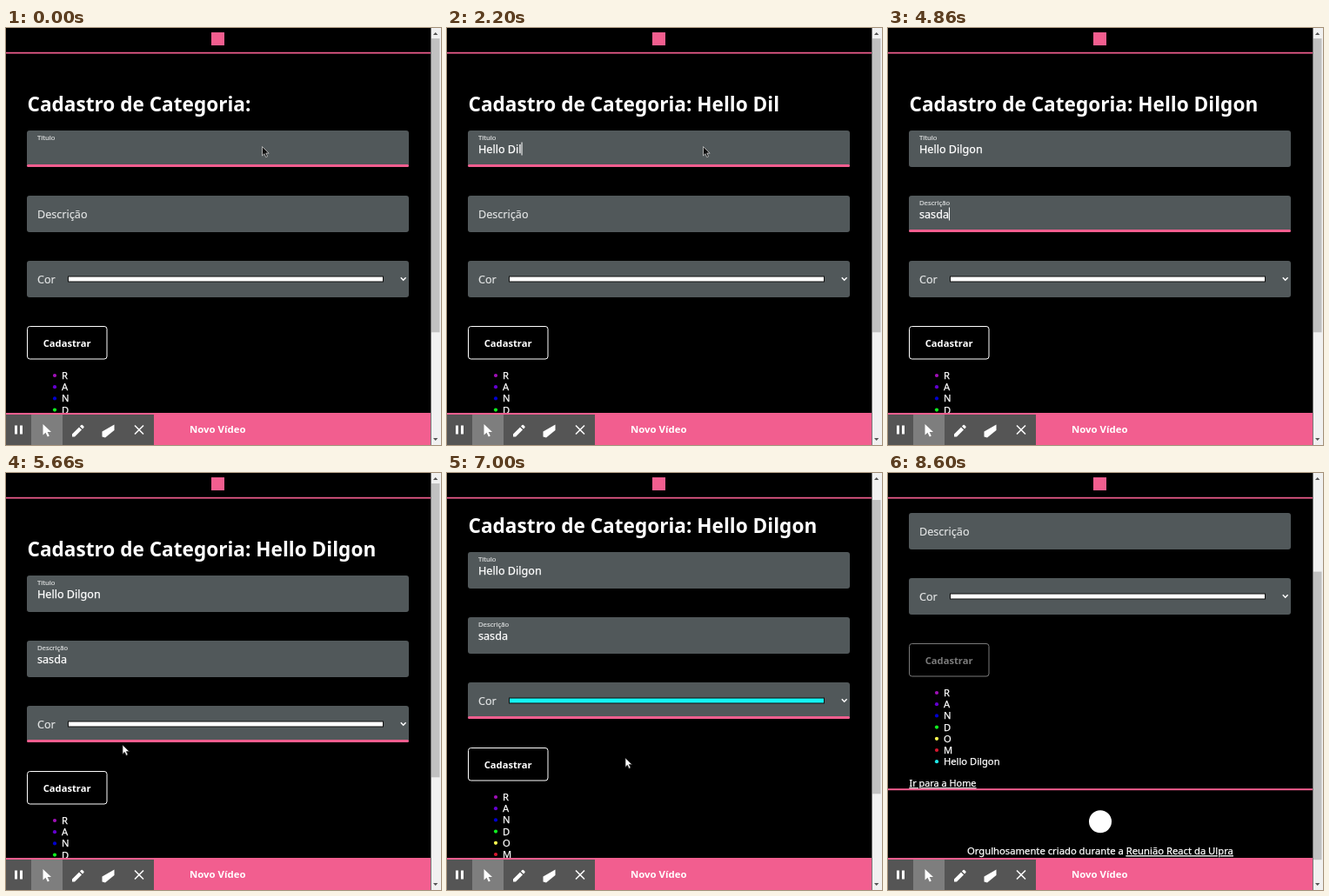
An HTML page for the animation above (8860 ms loop, 500 by 480 pixels).

```html
<!DOCTYPE html>
<html lang="pt">
<head>
<meta charset="utf-8">
<style>
html, body { margin: 0; width: 100%; height: 100%; overflow: hidden; background: #000; }
svg { display: block; font-family: "Noto Sans", "Open Sans", sans-serif; }
text { fill: #fff; stroke: #fff; stroke-width: .25; white-space: pre; }
.label { fill: #e2e4e4; stroke: #e2e4e4; stroke-width: .15; }
.bold { font-weight: 700; stroke: none; }
.pink { fill: #f25e8f; }
.link { text-decoration: underline; }
</style>
</head>
<body>
<svg id="stage" width="500" height="480" viewBox="0 0 500 480">
  <rect width="500" height="480"/>
  <g id="page">
    <text id="title" class="bold" x="24.5" y="96" font-size="22.6"></text>
    <g id="fields"></g>
    <rect id="swatch" x="71.5" y="286" width="362" height="6" stroke="#111"/>
    <path d="M453.8 287.3l2.9 2.9l2.9-2.9" fill="none" stroke="#fff" stroke-width="1.5"/>
    <g id="button">
      <rect x="24.5" y="343.5" width="91.5" height="37.5" rx="3" fill="none" stroke="#fff"/>
      <text class="bold" x="42.7" y="366.7" font-size="11.2">Cadastrar</text>
    </g>
    <g id="list" font-size="11.2"></g>
    <g id="foot">
      <text class="link" x="24.5" y="495" font-size="10.9">Ir para a Home</text>
      <rect class="pink" y="497" width="488" height="2"/>
      <circle cx="244" cy="535" r="13" fill="#fff"/>
      <text x="91" y="573" font-size="11.25">Orgulhosamente criado durante a <tspan class="link">Reunião React da Ulpra</tspan></text>
    </g>
  </g>
  <rect width="488" height="29"/>
  <rect class="pink" x="236" y="5" width="15" height="15"/>
  <rect class="pink" y="27.8" width="488" height="1.7"/>
  <rect class="pink" y="443" width="488" height="37"/>
  <text class="bold" x="211" y="466" font-size="11.4">Novo Vídeo</text>
  <rect y="445" width="170" height="35" fill="#555"/>
  <rect x="29" y="445" width="36" height="35" fill="#7e7e7e"/>
  <g fill="#fff">
    <path d="M10 457.500h3v10h-3zM16 457.500h3v10h-3z"/>
    <path d="M42.500 456v12.500l3-2.700l2.300 4.700l2-1l-2.200-4.600h4.400z"/>
    <path d="M76 470.500v-3l8-8l3 3l-8 8zM85 458.500l1.400-1.400q.8-.6 1.500 0l1.500 1.500q.6.800 0 1.500l-1.400 1.400z"/>
    <path d="M110.500 464.500l14-8v6.500l-10.500 8.500l-3.500-1z"/>
    <path d="M148 457.500l10 10m0-10l-10 10" stroke="#fff" stroke-width="1.600"/>
  </g>
  <rect x="488.5" width="11.5" height="480" fill="#f1f1f1"/>
  <rect id="thumb" x="489" width="9.500" fill="#c1c1c1"/>
  <path d="M491 8l2.700-3l2.700 3zM491 472l2.700 3l2.700-3z" fill="#555"/>
  <circle id="ring" fill="none" stroke="#a01028" stroke-width="1.200"/>
  <path id="arrow" d="M0 0v10.500l2.400-2.200l1.800 3.900l1.900-.9l-1.800-3.700h3.400z" stroke-width=".8"/>
  <path id="hand" d="M3 0q1.400 0 1.400 1.400v4q1-.6 2 .2q1.200-.4 2 .5q1.900-.2 1.900 1.700v3.200q0 2-1.200 3.200v1.600h-5.600v-1.400q-2.200-2.200-3.400-4.900q.5-1.700 1.700-.3v-7.800q0-1.400 1.200-1.400z" fill="#fff" stroke="#333" stroke-width=".7"/>
</svg>
<script>
const LOOP = 8860, PINK = '#f25e8f', WORD = 'Hello Dilgon';
const TITLE_KEYS = [200, 330, 660, 800, 1000, 1260, 1730, 1800, 2200, 2260, 2330, 2400];
const TEXT_KEYS = [4400, 4460, 4530, 4600, 4860];
const FOCUS = [-1000, 3400, 5330], PRESS = 7600, SUBMIT = 7730;
const PITCH = 13.2;

const $ = id => document.getElementById(id);
const set = (el, attrs) => { for (const k in attrs) el.setAttribute(k, attrs[k]); };
const add = (parent, tag, attrs, text = '') => {
  const el = document.createElementNS('http://www.w3.org/2000/svg', tag);
  set(el, attrs);
  el.textContent = text;
  return parent.appendChild(el);
};
const span = (t, a, b) => Math.min(1, Math.max(0, (t - a) / (b - a)));
const smooth = k => k * k * (3 - 2 * k);
const easeOut = k => 1 - (1 - k) ** 2;
const mix = (a, b, k) => a + (b - a) * k;
const show = (el, on) => set(el, { visibility: on ? 'visible' : 'hidden' });

const fields = ['Título', 'Descrição', 'Cor'].map((name, i) => {
  const g = add($('fields'), 'g', { transform: `translate(24 ${118 + 75 * i})` });
  add(g, 'rect', { width: 439, height: 42, rx: 3, fill: '#51585a' });
  return {
    line: add(g, 'rect', { y: 39, width: 439, height: 3, rx: 1.5, fill: PINK }),
    label: add(g, 'text', { x: 12, y: 25.5, 'font-size': 12.6, class: 'label' }, name),
    value: add(g, 'text', { x: 12, y: 25.5, 'font-size': 12.6 }),
    caret: add(g, 'rect', { y: 13.5, width: 1, height: 15, fill: '#fff' })
  };
});

const colors = ['#a010b8', '#6400d0', '#0000d0', '#10f020', '#ffff50', '#d81830', '#20e8e8'];
const items = [...'RANDOM', WORD].map((name, i) => {
  const g = add($('list'), 'g', { transform: `translate(0 ${400 + PITCH * i})` });
  add(g, 'circle', { cx: 56, cy: 0, r: 2.1, fill: colors[i] });
  add(g, 'text', { x: 64, y: 4 }, name);
  return g;
});

// Pointer stops: time, x, y
const stops = [
  [0, 294.5, 136.5], [2930, 294.5, 136.5], [3260, 189, 228], [5000, 189, 228],
  [5300, 134, 298], [5500, 134, 298], [5660, 134, 313], [6660, 134, 313],
  [6930, 205, 328], [7130, 205, 328], [7430, 88, 219.5], [LOOP, 88, 219.5]
];
function pointer(t) {
  const i = stops.findIndex(s => s[0] > t);
  const a = stops[i - 1], b = stops[i], k = smooth(span(t, a[0], b[0]));
  return [mix(a[1], b[1], k), mix(a[2], b[2], k)];
}

function typed(keys, word, t) {
  return t >= SUBMIT ? '' : word.slice(0, keys.filter(k => k <= t).length);
}

function drawFields(t) {
  const values = [typed(TITLE_KEYS, WORD, t), typed(TEXT_KEYS, 'sasda', t), ''];
  const keys = [TITLE_KEYS, TEXT_KEYS, []];
  $('title').textContent = 'Cadastro de Categoria: ' + values[0];
  fields.forEach((f, i) => {
    const start = FOCUS[i], end = FOCUS[i + 1] ?? PRESS;
    const glow = easeOut(span(t, start, start + 300)) - easeOut(span(t, end, end + 300));
    set(f.line, { opacity: glow });
    f.value.textContent = values[i];
    if (i > 1) return show(f.caret, false);
    const up = span(t, start, start + 100) - span(t, SUBMIT, SUBMIT + 100);
    set(f.label, { y: mix(25.5, 11, up), 'font-size': mix(12.6, 7.7, up) });
    const last = Math.max(i ? start + 30 : -500, ...keys[i].filter(k => k <= t));
    show(f.caret, t >= start && t < end && (t - last) % 1000 < 500);
    set(f.caret, { x: 12 + (values[i] && f.value.getComputedTextLength()) });
  });
}

function drawPointer(t) {
  const [x, y] = pointer(t), at = { transform: `translate(${x} ${y})` };
  const dark = t < 3260, onButton = t >= 7400;
  set($('arrow'), { ...at, fill: dark ? '#111' : '#fff', stroke: dark ? '#ccc' : '#333' });
  set($('hand'), at);
  show($('arrow'), !onButton && !(t >= 3260 && t < 5000));
  show($('hand'), onButton && t < 8530);

  const click = [3400, 5330, PRESS].find(c => t >= c && t < c + 330);
  show($('ring'), click);
  if (click) {
    const k = (t - click) / 330;
    set($('ring'), { cx: x + (onButton ? 3 : 0), cy: y + 1, r: 3 + 13 * k, opacity: 1 - k * 0.8 });
  }
}

function draw(t) {
  const added = t >= SUBMIT;
  const scroll = Math.round(147 * smooth(span(t, 6876, 7330)));
  const ratio = 456 / (added ? 660 : 647);
  set($('page'), { transform: `translate(0 ${-scroll})` });
  set($('thumb'), { y: 12 + scroll * ratio, height: 480 * ratio });
  set($('swatch'), { fill: t >= 6660 && !added ? '#14f4f4' : '#fff' });
  set($('button'), { opacity: mix(1, 0.48, span(t, 7350, 7650)) });
  show(items[6], added);
  set($('foot'), { transform: `translate(0 ${added ? PITCH : 0})` });
  drawFields(t);
  drawPointer(t);
}

const begin = performance.now();
function tick() {
  draw((performance.now() - begin) % LOOP);
  requestAnimationFrame(tick);
}
tick();
</script>
</body>
</html>
```
